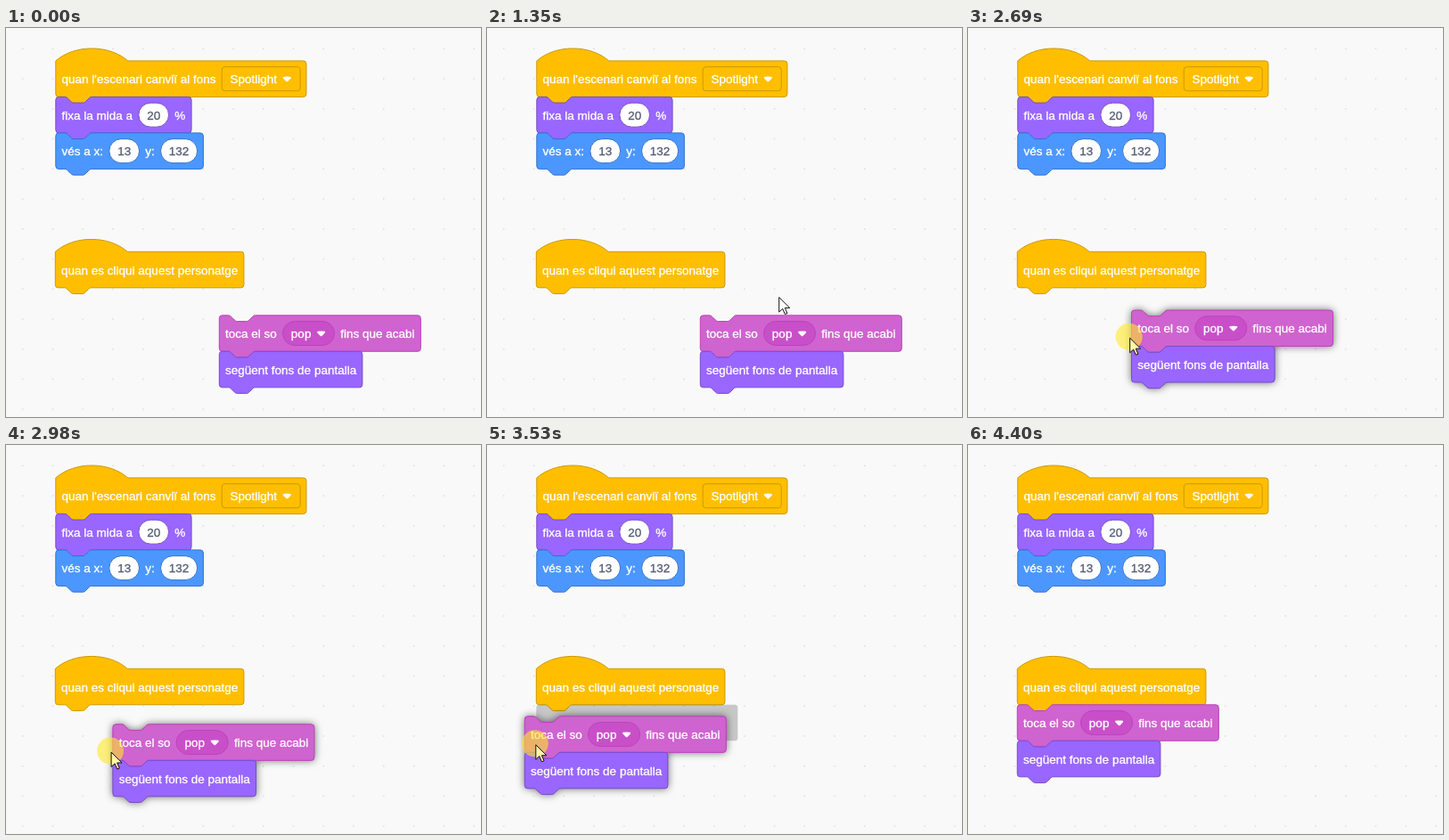
Recreate the animation shown at these times as an HTML page with a canvas. Size 533 by 437 pixels, loop 5200 ms.

```html
<!DOCTYPE html>
<html lang="ca">
<head>
<meta charset="utf-8">
<title>Blocs</title>
<style>
  html, body { margin: 0; width: 100%; height: 100%; overflow: hidden; background: #f9f9f9; }
  canvas { display: block; }
</style>
</head>
<body>
<canvas id="stage" width="533" height="437"></canvas>
<script>
const ctx = document.getElementById('stage').getContext('2d');
const LOOP = 5200, START = 460, STEP = 67.5;
const SCALE = 0.84375;           // block units to pixels
const ROW = 48;                  // block height in units
const FONT = '16px "Liberation Sans", Arial, sans-serif';

// Moments, counted in steps after START
const PRESS = 29, DRAG = 31, SNAP = 39, DROP = 51, EXIT = 54, GONE = 58;

const EVENT = { fill: '#ffbf00', edge: '#cc9900', field: '#ffbf00' };
const LOOKS = { fill: '#9966ff', edge: '#774dcb' };
const MOTION = { fill: '#4c97ff', edge: '#3373cc' };
const SOUND = { fill: '#cf63cf', edge: '#bd42bd', field: '#c94fc9' };

const label = text => ({ kind: 'label', text });
const number = text => ({ kind: 'number', text });
const menu = (text, radius) => ({ kind: 'menu', text, radius });

const whenBackdrop = { ...EVENT, hat: true, parts: [label("quan l'escenari canviï al fons"), menu('Spotlight', 4)] };
const setSize = { ...LOOKS, parts: [label('fixa la mida a'), number('20'), label('%')] };
const goTo = { ...MOTION, parts: [label('vés a x:'), number('13'), label('y:'), number('132')] };
const whenClicked = { ...EVENT, hat: true, parts: [label('quan es cliqui aquest personatge')] };
const playSound = { ...SOUND, parts: [label('toca el so'), menu('pop', 16), label('fins que acabi')] };
const nextBackdrop = { ...LOOKS, parts: [label('següent fons de pantalla')] };
const dragged = [playSound, nextBackdrop];

const arrowHead = new Path2D('M1.4,1.4Q2,1 6.4,1T11.3,1.4Q12.2,2.4 11.3,3.4L7.4,7.4Q6.4,8.2 5.4,7.4L1.4,3.4Q.5,2.4 1.4,1.4Z');
const pointer = new Path2D('M0,0V16.5L4,12.8L6.6,19L9.2,18L6.6,11.9H12Z');
const hand = new Path2D('M-4,8.5L-8,1.5q-1,-2.5 1,-2.5q1,0 2.5,2L-6,-5q-.6,-2 1,-2.3q1.5,0 2,2L-1.5,-1.5V-7q0,-1.7 1.5,-1.7q1.5,0 1.6,1.7V-2L2.7,-6q.5,-1.6 1.9,-1.3q1.4,.4 1.1,2L5,-1L6,-3q.8,-1.4 2,-.9q1.2,.6 .7,2L6,4L5,8.5Z');

const mix = (a, b, f) => a.map((v, i) => v + (b[i] - v) * f);
const progress = (from, to, step) => Math.min(1, Math.max(0, (step - from) / (to - from)));
const smooth = f => f * f * (3 - 2 * f);

// Each leg leaves the end of the one before; a bend makes it a curve.
function travel(start, legs, step, ease = f => f) {
  let pos = start;
  for (const { from, to, end, bend } of legs) {
    if (step < from) break;
    const f = ease(progress(from, to, step));
    pos = bend ? mix(mix(pos, bend, f), mix(bend, end, f), f) : mix(pos, end, f);
  }
  return pos;
}

const approach = [
  { from: 0, to: 2, end: [480, 419] },
  { from: 3, to: 11, end: [344, 293], bend: [555, 207] },
  { from: 11, to: 18, end: [262, 341] },
  { from: 19, to: 21, end: [262, 361] },
  { from: 24, to: PRESS, end: [251, 355] }
];
const drag = [
  { from: 30, to: 33, end: [183.5, 317] },
  { from: 33, to: 38, end: [104, 313] },
  { from: 38, to: 40, end: [53.5, 311] },
  { from: 40, to: 45, end: [42.3, 304.8] }
];
const leave = [{ from: EXIT, to: GONE - 1, end: [194, 405] }];
const HOME = [55.3, 291.8];

const stackAt = step => step >= DROP ? HOME : travel([239.3, 322.8], drag, step);

function cursorAt(step) {
  if (step < DRAG) return travel([480, 430], approach, step, smooth);
  if (step >= DROP) return travel([60, 330], leave, step);
  const [x, y] = stackAt(step + 0.9);   // the blocks trail the cursor
  return [x + 12.5, y + 32];
}

function partWidth({ kind, text }) {
  const w = ctx.measureText(text).width;
  return kind === 'number' ? Math.max(40, w + 22) : kind === 'menu' ? w + 42 : w;
}

function outline({ parts, hat }) {
  const w = parts.reduce((sum, part) => sum + partWidth(part) + 8, 8);
  const top = hat ? 'M0,0c25,-22 71,-22 96,0'
    : 'M0,4a4,4 0 0 1 4,-4H12c2,0 3,1 4,2l4,4c1,1 2,2 4,2h12c2,0 3,-1 4,-2l4,-4c1,-1 2,-2 4,-2';
  return new Path2D(`${top}H${w - 4}a4,4 0 0 1 4,4v40a4,4 0 0 1 -4,4H48c-2,0 -3,1 -4,2l-4,4
    c-1,1 -2,2 -4,2h-12c-2,0 -3,-1 -4,-2l-4,-4c-1,-1 -2,-2 -4,-2H4a4,4 0 0 1 -4,-4z`);
}

function inUnits([x, y], draw) {
  ctx.save();
  ctx.translate(x, y);
  ctx.scale(SCALE, SCALE);
  draw();
  ctx.restore();
}

function drawText(text, x, color) {
  ctx.save();
  ctx.fillStyle = ctx.strokeStyle = color;
  ctx.lineWidth = 0.4;           // medium weight
  ctx.fillText(text, x, 29.9);
  ctx.strokeText(text, x, 29.9);
  ctx.restore();
}

function drawPart(part, x, block) {
  const w = partWidth(part), { kind, text } = part;
  if (kind === 'label') {
    drawText(text, x, '#fff');
    return w;
  }
  ctx.beginPath();
  ctx.roundRect(x, 8, w, 32, part.radius || 16);
  ctx.fillStyle = kind === 'number' ? '#fff' : block.field;
  ctx.fill();
  ctx.stroke();
  if (kind === 'number') {
    drawText(text, x + (w - ctx.measureText(text).width) / 2, '#575e75');
  } else {
    drawText(text, x + 11, '#fff');
    ctx.save();
    ctx.translate(x + w - 24, 20);
    ctx.fillStyle = '#fff';
    ctx.fill(arrowHead);
    ctx.restore();
  }
  return w;
}

function drawStack([x, y], blocks) {
  blocks.forEach((block, i) => inUnits([x, y + i * ROW * SCALE], () => {
    const shape = outline(block);
    ctx.fillStyle = block.fill;
    ctx.strokeStyle = block.edge;
    ctx.lineWidth = 1 / SCALE;
    ctx.fill(shape);
    ctx.stroke(shape);
    let partX = 8;
    for (const part of block.parts) partX += drawPart(part, partX, block) + 8;
  }));
}

function drawShadow(pos, blocks) {
  inUnits(pos, () => {
    const all = new Path2D();
    blocks.forEach((block, i) => all.addPath(outline(block), new DOMMatrix().translate(0, i * ROW)));
    ctx.shadowColor = 'rgba(0,0,0,.6)';
    ctx.shadowBlur = 10;
    ctx.fillStyle = '#777';
    ctx.fill(all);
  });
}

function drawCursor(step) {
  const pos = cursorAt(step);
  const holding = step >= DRAG && step < DROP;
  const overBlock = !holding && step >= 16 && step <= EXIT;
  const shape = overBlock ? hand : pointer;
  ctx.save();
  ctx.translate(...pos);
  if (step >= PRESS && step < DROP) {
    ctx.fillStyle = 'rgba(255,232,40,.6)';
    ctx.beginPath();
    ctx.arc(-1, -1.5, 15, 0, 7);
    ctx.fill();
  }
  ctx.fillStyle = holding ? '#fff8a8' : '#fff';
  ctx.strokeStyle = '#111';
  ctx.lineJoin = 'round';
  ctx.fill(shape);
  ctx.stroke(shape);
  ctx.restore();
}

function drawGrid() {
  ctx.fillStyle = '#f9f9f9';
  ctx.fillRect(0, 0, 533, 437);
  ctx.fillStyle = '#e0e0e0';
  const gap = 40 * SCALE;
  for (let x = 18; x < 533; x += gap)
    for (let y = 22.5; y < 437; y += gap) ctx.fillRect(x, y, 1.6, 1.6);
}

function render(time) {
  const step = Math.floor((time % LOOP - START) / STEP);
  ctx.font = FONT;
  drawGrid();
  drawStack([55.8, 36.9], [whenBackdrop, setSize, goTo]);
  drawStack([55.3, 251.3], [whenClicked]);
  if (step >= SNAP && step < DROP) inUnits(HOME, () => {
    ctx.fillStyle = 'rgba(0,0,0,.2)';
    ctx.fill(outline(playSound));
  });

  const pos = stackAt(step);
  if (step >= DRAG && step < DROP) drawShadow(pos, dragged);
  drawStack(pos, dragged);
  if (step >= 0 && step < GONE) drawCursor(step);
}

const begin = performance.now();
function tick() {
  render(performance.now() - begin);
  requestAnimationFrame(tick);
}
tick();
</script>
</body>
</html>
```
